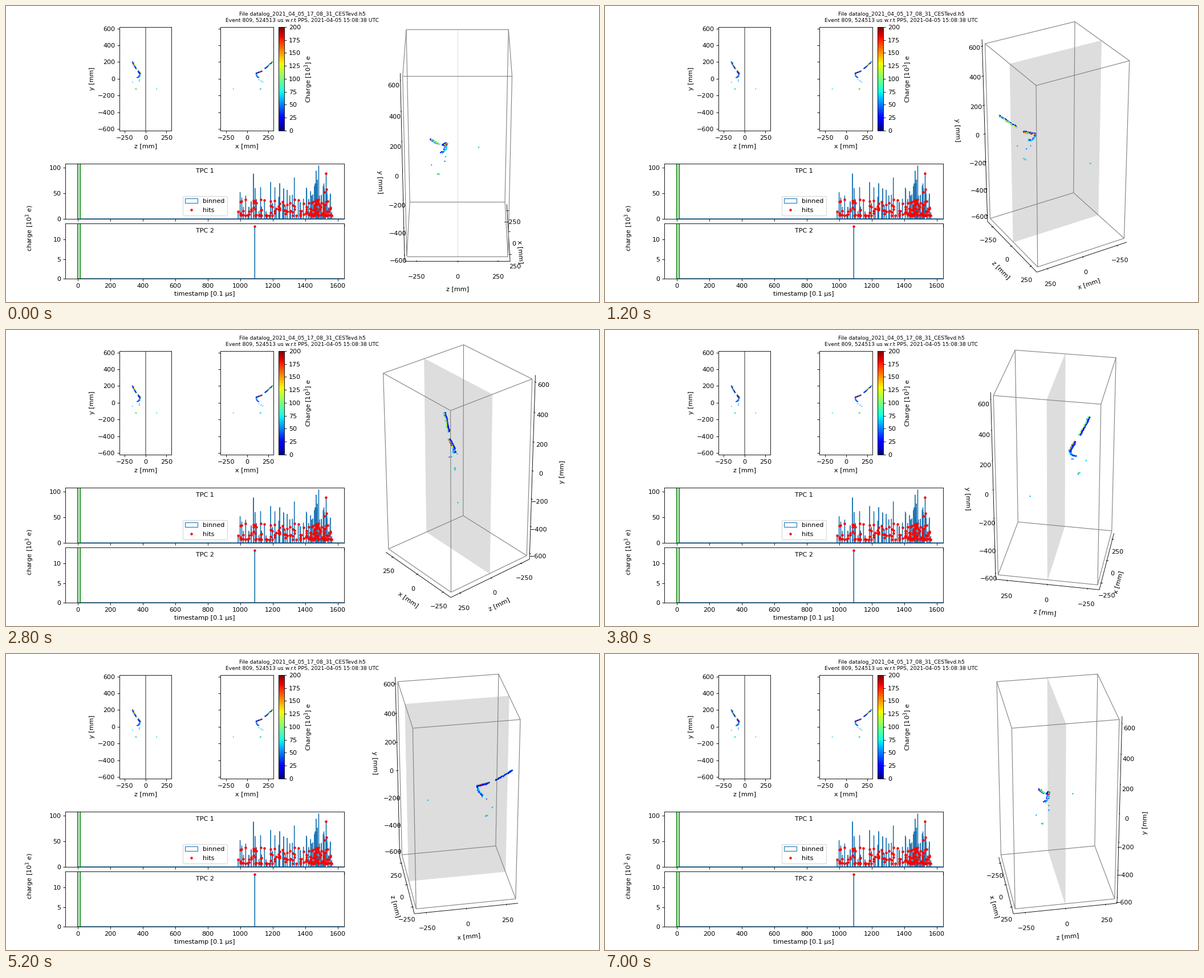
A matplotlib script for the animation above (7200 ms loop, 1040x520 px).

```python
import itertools

import matplotlib.pyplot as plt
import numpy as np
from matplotlib.animation import FuncAnimation
from matplotlib.cm import ScalarMappable
from matplotlib.collections import LineCollection
from matplotlib.colors import Normalize
from matplotlib.patches import Polygon

W, H, DPI = 1040, 520, 80
FRAMES, INTERVAL = 36, 200
rng = np.random.default_rng(9)

# Detector half sizes in mm, ordered x, z, y (y points up on screen).
LIM = np.array([310, 310, 618.5])
HALF = 1.82946 / (2 * np.sqrt(6)) * np.array([1, 1, 2])
CENTER_X, CENTER_Y, SCALE, DIST = 791.6, 241.5, 2389, 10
COS_E, SIN_E = np.cos(np.pi / 6), np.sin(np.pi / 6)
EDGE, DELTA = LIM * 25 / 24, LIM / 6
PER_POINT = 48 / 796

fig = plt.figure(figsize=(W / DPI, H / DPI), dpi=DPI, facecolor="white")


def add_axes(left, top, right, bottom):
    """Axes whose spines fall on the given pixel columns and rows."""
    return fig.add_axes([(left + 0.2) / W, 1 - (bottom + 0.8) / H,
                         (right - left) / W, (bottom - top) / H])


def along(points, n, spread=1.5):
    """Sample a polyline with a little scatter."""
    t, knots = np.linspace(0, 1, n), np.linspace(0, 1, len(points))
    path = np.stack([np.interp(t, knots, c) for c in np.transpose(points)], 1)
    return path + rng.normal(0, spread, path.shape)


def make_hits():
    """Two track pieces, a hook and stray hits; faint hits trail behind."""
    upper = [(309, -151, 204), (262, -128, 160), (217, -104, 120)]
    lower = [(180, -81, 90), (114, -62, 66)]
    hook = [(112, -62, 60), (121, -69, 28), (140, -92, 14)]
    stray = [(187, -155, -41), (167, -75, -27), (140, -71, -11), (-163, 133, -122)]
    cluster = [(163, -116, -122)] * 4
    trail = (-4, -8, 0)
    parts = [
        (along(upper, 28), (50, 140)), (along(upper, 36) + trail, (10, 50)),
        (along(lower, 22), (60, 210)), (along(lower, 36) + trail, (8, 45)),
        (along(hook, 16), (40, 75)), (along(hook, 8) + trail, (15, 50)),
        (along(stray, 4, 0), (45, 65)), (along(cluster, 4, 3), (20, 120)),
    ]
    pos = np.concatenate([p for p, _ in parts])
    charge = np.concatenate([rng.uniform(*r, len(p)) for p, r in parts])
    order = rng.permutation(len(pos))
    return pos[order], charge[order]


def make_bursts(start, stop, count, most):
    """Bursts of nearly simultaneous hits as rows of time and charge."""
    times = np.linspace(start, stop, count) + rng.uniform(-5, 5, count)
    times = np.repeat(times, rng.integers(1, most + 1, count))
    return np.column_stack([times, 6 + 32 * rng.random(len(times)) ** 2])


hits, charge = make_hits()
norm = Normalize(0, 200)
dots = dict(c=charge, cmap="jet", norm=norm, linewidths=0)

# Side and front projections
side = add_axes(199, 36, 290, 218)
side.axvline(0, color="gray", lw=1.5)
side.scatter(hits[:, 1], hits[:, 2], s=2.4, zorder=3, **dots)
side.set(xlim=(-310, 310), xlabel="z [mm]", ylabel="y [mm]")
front = add_axes(376, 36, 469, 218)
front.scatter(hits[:, 0], hits[:, 2], s=2.4, zorder=3, **dots)
front.set(xlim=(-315, 315), xlabel="x [mm]")
front.tick_params(labelleft=False)
for ax in (side, front):
    ax.set(ylim=(-LIM[2], LIM[2]), xticks=(-250, 0, 250),
           yticks=range(-600, 601, 200))

bar = fig.colorbar(ScalarMappable(norm, "jet"), cax=add_axes(478, 36, 488, 218),
                   ticks=range(0, 201, 25))
bar.set_label("Charge [10$^3$] e")

fig.suptitle("File datalog_2021_04_05_17_08_31_CESTevd.h5\n"
             "Event 809, 524513 us w.r.t PPS, 2021-04-05 15:08:38 UTC",
             fontsize="small", y=0.98)

# Charge against time
pulses = np.vstack([make_bursts(990, 1400, 38, 3), make_bursts(1408, 1560, 38, 4),
                    [(1517, 52), (1528, 89), (1532, 58)]])


def add_time_plot(name, top, y_max, step, points):
    ax = add_axes(104, top, 593, top + 97)
    t, q = points.T
    ax.hist(t, weights=q, bins=np.arange(0, 1640, 2), histtype="step", label="binned")
    ax.plot(t, q, "r.", zorder=3, label="hits")
    for mark in (0, 14):
        ax.axvline(mark, color="g", lw=1.5)
    ax.text(0.5, 1 - 13 / 97, name, transform=ax.transAxes, ha="center", va="center")
    ax.set(xlim=(-77.3, 1640.3), ylim=(0, y_max), xticks=range(0, 1601, 200),
           yticks=np.arange(0, y_max, step))
    return ax


add_time_plot("TPC 1", 276, 107.8, 50, pulses).legend(loc="lower center")
add_time_plot("TPC 2", 381, 14.2, 5, np.array([(1089, 13.5)])).set_xlabel(
    "timestamp [0.1 µs]")
fig.text(41.5 / W, 1 - 390.5 / H, "charge [10$^3$ e)", rotation=90,
         ha="center", va="center")

# Rotating view, drawn in stage pixels
stage = fig.add_axes([0, 0, 1, 1])
stage.set(xlim=(0, W), ylim=(H, 0))
stage.axis("off")


def project(points, azimuth):
    """Perspective projection to stage pixels, with the depth of each point."""
    x, y, z = np.moveaxis(np.asarray(points) / LIM * HALF, -1, 0)
    c, s = np.cos(azimuth), np.sin(azimuth)
    right, toward = y * c - x * s, x * c + y * s
    depth = DIST - toward * COS_E - z * SIN_E
    xy = np.stack([CENTER_X + SCALE * right / depth,
                   CENTER_Y - SCALE * (z * COS_E - toward * SIN_E) / depth], -1)
    return xy, depth


corners = np.array(list(itertools.product((-1, 1), repeat=3))) * LIM
box = np.array([(a, b) for a, b in itertools.combinations(corners, 2)
                if np.count_nonzero(a != b) == 1])
cathode = np.array([(-1, 0, -1), (1, 0, -1), (1, 0, 1), (-1, 0, 1)]) * LIM

plane = stage.add_patch(Polygon(np.zeros((4, 2)), fc="#dddddd", ec="#dddddd",
                                lw=0.7, zorder=2))
frame_lines = stage.add_collection(LineCollection([], colors="gray", lw=1, zorder=3))
axis_lines = stage.add_collection(LineCollection([], colors="black", lw=0.8, zorder=1))
cloud = stage.scatter(hits[:, 0], hits[:, 1], s=4.8, zorder=4, **dots)


class Axis:
    def __init__(self, index, name, ticks, pad):
        self.index, self.ticks, self.pad = index, ticks, pad
        self.tick_dir = 1 if index == 0 else 0
        self.label = stage.text(0, 0, name, ha="center", va="center", zorder=1)
        self.numbers = [stage.text(0, 0, str(t).replace("-", "\u2212"),
                                   ha="center", va="top", zorder=1) for t in ticks]

    def update(self, azimuth, near_x, near_y):
        """Place the labels and return the line segments of this axis."""
        i, d = self.index, self.tick_dir
        sign = np.array([near_x, -near_y if i == 2 else near_y, -1.0])
        sign[i] = 0
        base = sign * EDGE
        ends = np.array([base, base])
        ends[:, i] = -EDGE[i], EDGE[i]
        line = project(ends, azimuth)[0]
        segments = [line]

        dx, dy = line[1] - line[0]
        angle = np.degrees(np.arctan2(-dy, dx)) % 180
        self.label.set_rotation(angle - 180 if angle > 90 else angle)
        self.label.set_position(
            project(base + sign * (self.pad + 21) * PER_POINT * DELTA, azimuth)[0])

        for t, number in zip(self.ticks, self.numbers):
            mark = np.array([base, base])
            mark[:, i] = t
            mark[:, d] += sign[d] * DELTA[d] * np.array([0.2, -0.1])
            segments.append(project(mark, azimuth)[0])
            spot = base + sign * 11.5 * PER_POINT * DELTA
            spot[i] = t
            number.set_position(project(spot, azimuth)[0])
        return segments


axes = [Axis(0, "x [mm]", (-250, 0, 250), 4),
        Axis(1, "z [mm]", (-250, 0, 250), 4),
        Axis(2, "y [mm]", range(-600, 601, 200), 20)]


def draw(frame):
    azimuth = np.radians(360 * frame / FRAMES)
    near_x = 1 if np.cos(azimuth) >= 0 else -1
    near_y = 1 if np.sin(azimuth) >= 0 else -1
    axis_lines.set_segments([s for a in axes for s in a.update(azimuth, near_x, near_y)])
    frame_lines.set_segments(project(box, azimuth)[0])
    plane.set_xy(project(cathode, azimuth)[0])
    xy, depth = project(hits, azimuth)
    order = np.argsort(-depth)
    cloud.set_offsets(xy[order])
    cloud.set_array(charge[order])
    return []


anim = FuncAnimation(fig, draw, frames=FRAMES, interval=INTERVAL,
                     repeat=True, repeat_delay=0)
plt.show()
```
